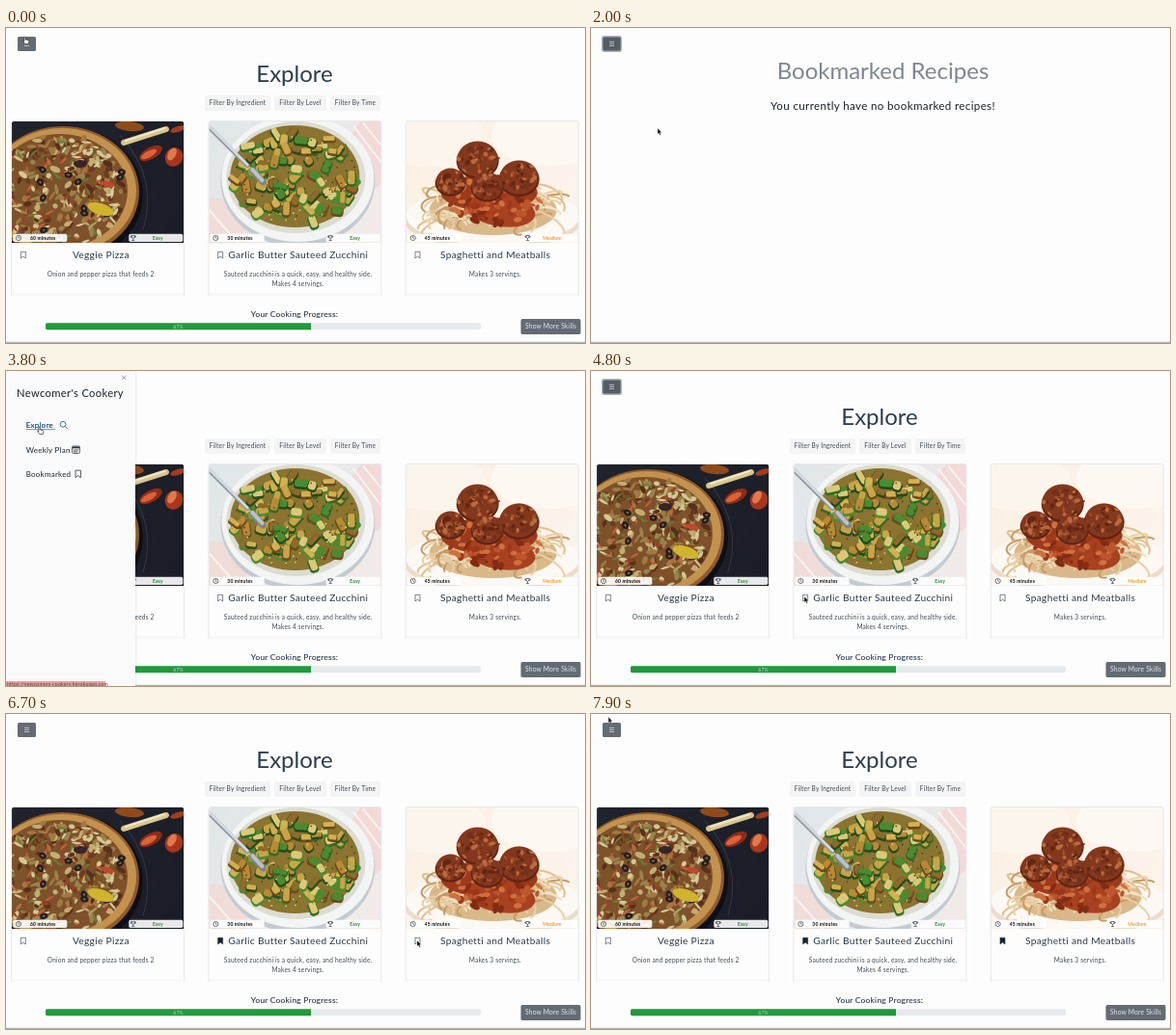
Recreate the animation shown at these times as an HTML page with a canvas. Size 600 by 327 pixels, loop 8000 ms.

```html
<!DOCTYPE html>
<html lang="en">
<head>
<meta charset="utf-8">
<title>Recipe explorer</title>
<style>
html, body { margin: 0; width: 100%; height: 100%; overflow: hidden; background: #fdfdfd; }
#stage { position: relative; width: 600px; height: 327px; overflow: hidden; }
canvas, svg, #explore { position: absolute; left: 0; top: 0; width: 600px; height: 327px; }
text {
  font-family: Lato, "Open Sans", sans-serif; fill: #2c3e50;
  letter-spacing: .03em; font-variant-ligatures: none;
}
.mid { text-anchor: middle; }
.h1 { font-size: 24px; letter-spacing: 0; }
.title { font-size: 10.2px; fill: #2a3947; }
.small { font-size: 6.55px; fill: #434b53; }
.tag { font-size: 5px; font-weight: 700; fill: #111; }
.nav { font-size: 8px; fill: #1d2731; }
.line { fill: none; stroke: #2b343c; stroke-width: .8; }

/* Everything shares one 8 s clock. */
#explore, #saved, .h1, #side, #ring, #status, .hot, .mark, #rule, #pointer, #arrow, #hand {
  animation: 8s step-end infinite;
}
#explore { animation-name: explore; }
#saved { animation-name: saved; }
#explore .h1 { animation-name: exploreTitle; }
#saved .h1 { animation-name: savedTitle; }
#side { animation-name: side; animation-timing-function: ease-in-out; }
#ring { animation-name: ring; }
#status { animation-name: status; }
#hotExplore { animation-name: hotExplore; }
#hotSaved { animation-name: hotSaved; }
.m1 { animation-name: fillSecond; }
.m2 { animation-name: fillThird; }
#rule { animation-name: rule; }
#pointer { animation-name: move; animation-timing-function: ease-in-out; }
#arrow { animation-name: arrow; }
#hand { animation-name: hand; }

@keyframes explore { 0%, 46.9% { visibility: visible } 20% { visibility: hidden } }
@keyframes saved { 0%, 46.9% { visibility: hidden } 20% { visibility: visible } }
@keyframes exploreTitle {
  0%, 19% { opacity: 1 } 20% { opacity: 0 }
  48% { opacity: 0; animation-timing-function: ease } 61%, 100% { opacity: 1 }
}
@keyframes savedTitle {
  0% { opacity: 0 } 20.6% { opacity: 0; animation-timing-function: ease } 33%, 100% { opacity: 1 }
}
@keyframes side {
  0%, 2.5%, 23%, 35%, 51.5%, 100% { transform: translateX(-140px) }
  6.25%, 20%, 38.75%, 48% { transform: translateX(0) }
}
@keyframes ring { 0%, 63.75% { opacity: 0 } 20% { opacity: 1 } }
@keyframes status { 0%, 20.6%, 50% { opacity: 0 } 14%, 43.7% { opacity: 1 } }
@keyframes hotSaved { 0%, 20.6% { opacity: 0 } 13.7% { opacity: 1 } }
@keyframes hotExplore { 0%, 50% { opacity: 0 } 42.5% { opacity: 1 } }
@keyframes fillSecond { 0% { fill: transparent } 63.75%, 100% { fill: #17212b } }
@keyframes fillThird { 0% { fill: transparent } 87.5%, 100% { fill: #17212b } }
@keyframes rule { 0%, 72.4% { opacity: 0 } 70% { opacity: 1 } }
@keyframes move {
  0%, 3.75% { transform: translate(19px, 9px) }
  14%, 20% { transform: translate(44px, 103px) }
  24.5%, 26% { transform: translate(69px, 104px) }
  33%, 36% { transform: translate(20px, 14px) }
  43.5%, 49.5% { transform: translate(34px, 58px) }
  58.5%, 65% { transform: translate(221px, 234px) }
  70.8%, 72% { transform: translate(439px, 249px) }
  78%, 90% { transform: translate(426px, 235px) }
  98%, 100% { transform: translate(18px, 3px) }
}
@keyframes arrow { 0%, 13.7%, 32.6%, 42.5% { opacity: 0 } 4%, 20.6%, 37%, 50% { opacity: 1 } }
@keyframes hand { 0%, 13.7%, 32.6%, 42.5% { opacity: 1 } 4%, 20.6%, 37%, 50% { opacity: 0 } }
</style>
</head>
<body>
<div id="stage">
  <div id="explore">
    <canvas id="photos" width="1200" height="654"></canvas>
    <svg viewBox="0 0 600 327">
      <text class="h1 mid" x="299" y="55.6">Explore</text>
      <g fill="#f4f4f5">
        <rect x="206" y="70" width="68" height="16" rx="2"/>
        <rect x="278" y="70" width="54" height="16" rx="2"/>
        <rect x="336" y="70" width="52" height="16" rx="2"/>
      </g>
      <g class="mid">
        <text class="small" x="240" y="80.3">Filter By Ingredient</text>
        <text class="small" x="305" y="80.3">Filter By Level</text>
        <text class="small" x="362" y="80.3">Filter By Time</text>
      </g>
      <g id="cards"></g>
      <path id="rule" class="line" d="M240 243.7H262.5"/>
      <text class="mid" x="299" y="299.5" font-size="8.4" stroke="#2c3e50" stroke-width=".15">Your Cooking Progress:</text>
      <rect x="41" y="306.3" width="451" height="7" rx="1.7" fill="#e7eaed"/>
      <path d="M42.7 306.3H316V313.3H42.7a1.7 1.7 0 0 1-1.7-1.7V308a1.7 1.7 0 0 1 1.7-1.7Z" fill="#21993c"/>
      <text class="mid" x="178.5" y="311.7" font-size="5" style="fill:#b9e3c2">67%</text>
      <rect x="533.5" y="302" width="62" height="16" rx="1.7" fill="#636b73"/>
      <text class="mid" x="564.5" y="312.4" font-size="6.7" style="fill:#e6e8ea">Show More Skills</text>
    </svg>
  </div>
  <svg viewBox="0 0 600 327">
    <g id="saved">
      <text class="h1 mid" x="302.5" y="53">Bookmarked Recipes</text>
      <text class="mid" x="302.5" y="85" font-size="11.6" style="fill:#17222d">You currently have no bookmarked recipes!</text>
    </g>
    <path d="M0 326.3H600" stroke="#a2a4a6" stroke-width="1"/>
    <rect x="12" y="9" width="19" height="15" rx="1.5" fill="#646b73"/>
    <rect id="ring" x="11.7" y="8.7" width="19.6" height="15.6" rx="2" fill="#555c64" stroke="#a9b2bb" stroke-width="1.4"/>
    <path d="M19 14.3h5M19 16.4h5M19 18.5h5" stroke="#e6e8ea" stroke-width=".7"/>
    <g id="side">
      <rect x="134" width="1.5" height="327" fill="#000" opacity=".05"/>
      <rect width="134" height="327" fill="#fafafa"/>
      <path d="M120 4.7l4.4 4.4M124.4 4.7l-4.4 4.4" stroke="#777" stroke-width=".7"/>
      <text class="mid" x="66.5" y="27.3" font-size="11.2" style="fill:#17222d">Newcomer's Cookery</text>
      <text class="nav" x="20.7" y="59.4">Explore</text>
      <g class="hot" id="hotExplore">
        <text class="nav" x="20.7" y="59.4" style="fill:#3478ae">Explore</text>
        <path d="M20.7 60.7H51" stroke="#3478ae" stroke-width=".8"/>
      </g>
      <g fill="none" stroke="#2a6a9d" stroke-width=".9">
        <circle cx="59" cy="55.3" r="2.9"/><path d="M61.2 57.4l3 3"/>
      </g>
      <text class="nav" x="20.7" y="84.5">Weekly Plan</text>
      <g class="line">
        <rect x="68.7" y="78" width="7.6" height="7.4" rx=".8"/>
        <path d="M68.7 79.4h7.6" stroke-width="1.8"/>
        <path d="M70 82h5M70 83.8h4" stroke-width=".8"/>
      </g>
      <text class="nav" x="20.7" y="109.7">Bookmarked</text>
      <g class="hot" id="hotSaved">
        <text class="nav" x="20.7" y="109.7" style="fill:#3478ae">Bookmarked</text>
        <path d="M20.7 111H70" stroke="#3478ae" stroke-width=".8"/>
      </g>
      <path class="line" d="M72 103.2h5.4v7.4l-2.7-2-2.7 2Z"/>
    </g>
    <g id="status">
      <rect y="322" width="103" height="5" fill="#e3a0a0"/>
      <text x="1" y="327.2" font-size="5.2" style="fill:#6b3a3e">https://newcomers-cookery.herokuapp.com</text>
    </g>
    <g id="pointer" stroke="#fff" stroke-width=".4">
      <path id="arrow" d="M0 0V6.2L1.4 5 2.4 7.2 3.5 6.7 2.5 4.6H4.3Z" fill="#000"/>
      <path id="hand" d="M0 .6q.7-1 1.3 0V3l3 .7q.7.3.5 1.2L4.3 7.6H.9L-1.4 4.6q0-1 1.4 0Z" fill="#fff" stroke="#111" stroke-width=".6"/>
    </g>
  </svg>
</div>
<script>
const recipes = [
  { title: "Veggie Pizza", lines: ["Onion and pepper pizza that feeds 2"], time: 60, level: "Easy" },
  { title: "Garlic Butter Sauteed Zucchini", lines: ["Sauteed zucchini is a quick, easy, and healthy side.", "Makes 4 servings."], time: 30, level: "Easy" },
  { title: "Spaghetti and Meatballs", lines: ["Makes 3 servings."], time: 45, level: "Medium" }
];
const CARD_STEP = 204.35;

function cardMarkup(r, i) {
  const levelColor = r.level === "Easy" ? "#278a36" : "#f39b21";
  return `<g transform="translate(${6 + i * CARD_STEP} 0)">
    <path d="M-.4 278V98.5q0-2 2-2H176.6q2 0 2 2V278" fill="none" stroke="#e2e4e5" stroke-width=".8"/>
    <g fill="#fff" opacity=".9">
      <rect x="1.3" y="213.7" width="56" height="8.4" rx="1.8"/>
      <rect x="121.3" y="213.7" width="56" height="8.4" rx="1.8"/>
    </g>
    <g class="line" style="stroke-width:.65">
      <circle cx="7" cy="218" r="2.6"/><path d="M7 216.2V218l1.2.8"/>
      <path d="M124.2 215.5h3.2v1.6q-1.6 2.6-3.2 0ZM124.2 216h-1.1q0 1.7 1.5 1.7M127.4 216h1.1q0 1.7-1.5 1.7M125.8 218.4v2M124.2 220.6h3.2"/>
    </g>
    <text class="tag" x="19" y="219.9">${r.time} minutes</text>
    <text class="tag mid" x="151.3" y="219.9" style="fill:${levelColor}">${r.level}</text>
    <path class="mark m${i}" d="M9.3 232.3h5v6.7l-2.5-1.9-2.5 1.9Z" fill="transparent" stroke="#26313b" stroke-width=".6"/>
    <text class="title mid" x="92.4" y="239.2">${r.title}</text>
    ${r.lines.map((s, n) => `<text class="small mid" x="92.2" y="${258 + n * 10}">${s}</text>`).join("")}
    <rect x="0" y="275" width="178" height="3" fill="#000" opacity=".02"/>
  </g>`;
}
document.getElementById("cards").innerHTML = recipes.map(cardMarkup).join("");

const ctx = document.getElementById("photos").getContext("2d");
ctx.scale(2, 2);
let seed = 7;
const rnd = () => (seed = seed * 16807 % 2147483647) / 2147483647;
const pick = list => list[Math.floor(rnd() * list.length)];

function oval(x, y, rx, ry, color, turn = 0) {
  ctx.fillStyle = color;
  ctx.beginPath();
  ctx.ellipse(x, y, rx, ry, turn, 0, 7);
  ctx.fill();
}
function chunk(x, y, w, h, color, turn) {
  ctx.save();
  ctx.translate(x, y);
  ctx.rotate(turn);
  ctx.fillStyle = color;
  ctx.beginPath();
  ctx.roundRect(-w / 2, -h / 2, w, h, h * .35);
  ctx.fill();
  ctx.restore();
}
function stroke(color, width, d) {
  ctx.strokeStyle = color;
  ctx.lineWidth = width;
  ctx.lineCap = "round";
  ctx.stroke(new Path2D(d));
}
function scatter(n, [cx, cy, rx, ry], draw) {
  while (n--) {
    const a = rnd() * 6.283, d = Math.sqrt(rnd());
    draw(cx + Math.cos(a) * d * rx, cy + Math.sin(a) * d * ry, rnd() * 3.14);
  }
}
// Origin is the photo's top left corner, 178 by 126.
function photo(i, from, to, draw) {
  ctx.save();
  ctx.translate(6 + i * CARD_STEP, 97);
  ctx.beginPath();
  ctx.roundRect(0, 0, 178.3, 126, [2, 2, 0, 0]);
  ctx.clip();
  const g = ctx.createLinearGradient(0, 0, 178, 126);
  g.addColorStop(0, from);
  g.addColorStop(1, to);
  ctx.fillStyle = g;
  ctx.fillRect(0, 0, 179, 126);
  draw();
  ctx.restore();
}

photo(0, "#22242d", "#1a1c27", () => {
  stroke("#343742", 1, "M112 14Q152 58 136 112");
  oval(122, 5, 15, 5, "#8f4a1c", .1);
  stroke("#d8c58e", 6, "M116 22L160 8");
  stroke("#f0e5c0", 2.4, "M118 20L158 7");
  oval(144, 33, 13, 6, "#8e2c18", -.5);
  oval(142, 34, 9, 3.4, "#dc6238", -.5);
  oval(168, 37, 9, 10, "#a8351c", .5);
  oval(166, 34, 4, 7, "#e07a4c", .5);
  oval(172, 8, 8, 3, "#a33c1e", -.3);
  oval(54, 76, 82, 71, "#0e0f15");
  oval(53, 73, 79, 68, "#8f5c2a");
  oval(52, 72, 77, 65, "#c4924f");
  oval(50, 72, 70, 59, "#7d512a");
  const area = [50, 72, 69, 58];
  scatter(260, area, (x, y, t) => oval(x, y, 2 + rnd() * 4, 1 + rnd() * 2.2, pick(["#c2ad72", "#a07a42", "#d5c795", "#6b3d20", "#99834c", "#573019"]), t));
  scatter(90, area, (x, y, t) => oval(x, y, 2 + rnd() * 4, 1.1, pick(["#6b7838", "#a13c24", "#a9a765", "#d8cb9c", "#c5613a"]), t));
  scatter(12, area, (x, y, t) => {
    oval(x, y, 4.2, 3.2, "#241c20", t);
    oval(x, y, 1.4, 1, "#8d7048", t);
  });
  oval(92, 91, 14, 6, "#cfb42c", .3);
  oval(71, 44, 7, 4, "#35262a");
  oval(99, 65, 7, 3, "#c2472c", .3);
});

photo(1, "#dfe7ea", "#f3ebe9", () => {
  oval(168, 32, 26, 48, "#f1dad8", .4);
  oval(6, 112, 34, 32, "#f0dcd9", .5);
  stroke("#fbf3f1", 2, "M150 5L178 42M160 2L178 24M0 92L30 126");
  oval(92, 62, 80, 68, "#c3cbd0");
  oval(92, 59, 79, 66, "#f3f4f4");
  oval(90, 58, 72, 58, "#dcdcd2");
  oval(89, 57, 67, 53, "#8b7330");
  const area = [89, 57, 64, 50];
  scatter(105, area, (x, y, t) => {
    const w = 10 + rnd() * 7, h = 7 + rnd() * 4;
    chunk(x, y + 1.4, w, h, pick(["#2f6a26", "#234d1c", "#6a4a1c", "#4a8a2f"]), t);
    chunk(x, y, w - 2, h - 2.4, pick(["#d3b050", "#b98a35", "#c9a446", "#8f6a2a", "#4c8a30", "#dcc878"]), t);
  });
  scatter(70, area, (x, y) => oval(x, y, .8, .8, pick(["#eee0a0", "#4b3317", "#203c16"])));
  stroke("#8b959d", 4.4, "M0 6L40 46");
  stroke("#d5dce1", 2.6, "M0 5L40 45");
  stroke("#7d858b", 7, "M45 51L56 63");
  stroke("#bac2c7", 4, "M45 50L55 61");
});

photo(2, "#fbf0e3", "#fbf5ee", () => {
  oval(28, 18, 55, 30, "#fcf5ec");
  oval(148, 14, 60, 32, "#fdf8f1");
  oval(90, 102, 92, 31, "#ecdccb");
  oval(90, 98, 90, 30, "#fcf8f3");
  oval(90, 92, 66, 26, "#d9b88a");
  for (let n = 0; n < 85; n++) {
    const x = 28 + rnd() * 122, y = 76 + rnd() * 34, w = 9 + rnd() * 16;
    ctx.strokeStyle = pick(["#e9cfa6", "#f3e2c4", "#c59a66", "#e0bf8d"]);
    ctx.lineWidth = 2;
    ctx.beginPath();
    ctx.ellipse(x, y, w, 5 + rnd() * 8, rnd() - .5, 2 + rnd() * 2, 5 + rnd() * 2);
    ctx.stroke();
  }
  oval(86, 74, 50, 19, "#9c3a1b");
  oval(98, 92, 36, 17, "#a8411f", .15);
  scatter(80, [92, 82, 48, 25], (x, y, t) => oval(x, y, 2 + rnd() * 4, 1.5 + rnd() * 2, pick(["#bd552d", "#822c14", "#cf7040", "#9b3819"]), t));
  for (const [x, y, r] of [[46, 62, 16], [74, 39, 22], [117, 58, 21], [84, 67, 17]]) {
    oval(x, y + 2, r, r * .86, "#5f2513");
    oval(x, y, r - 1, r * .84, "#83381e");
    scatter(34, [x, y, r - 2, r * .74], (px, py, t) => oval(px, py, 1 + rnd() * 3, 1 + rnd() * 1.5, pick(["#a0502c", "#642611", "#b96a3e", "#743018"]), t));
  }
});
</script>
</body>
</html>
```
